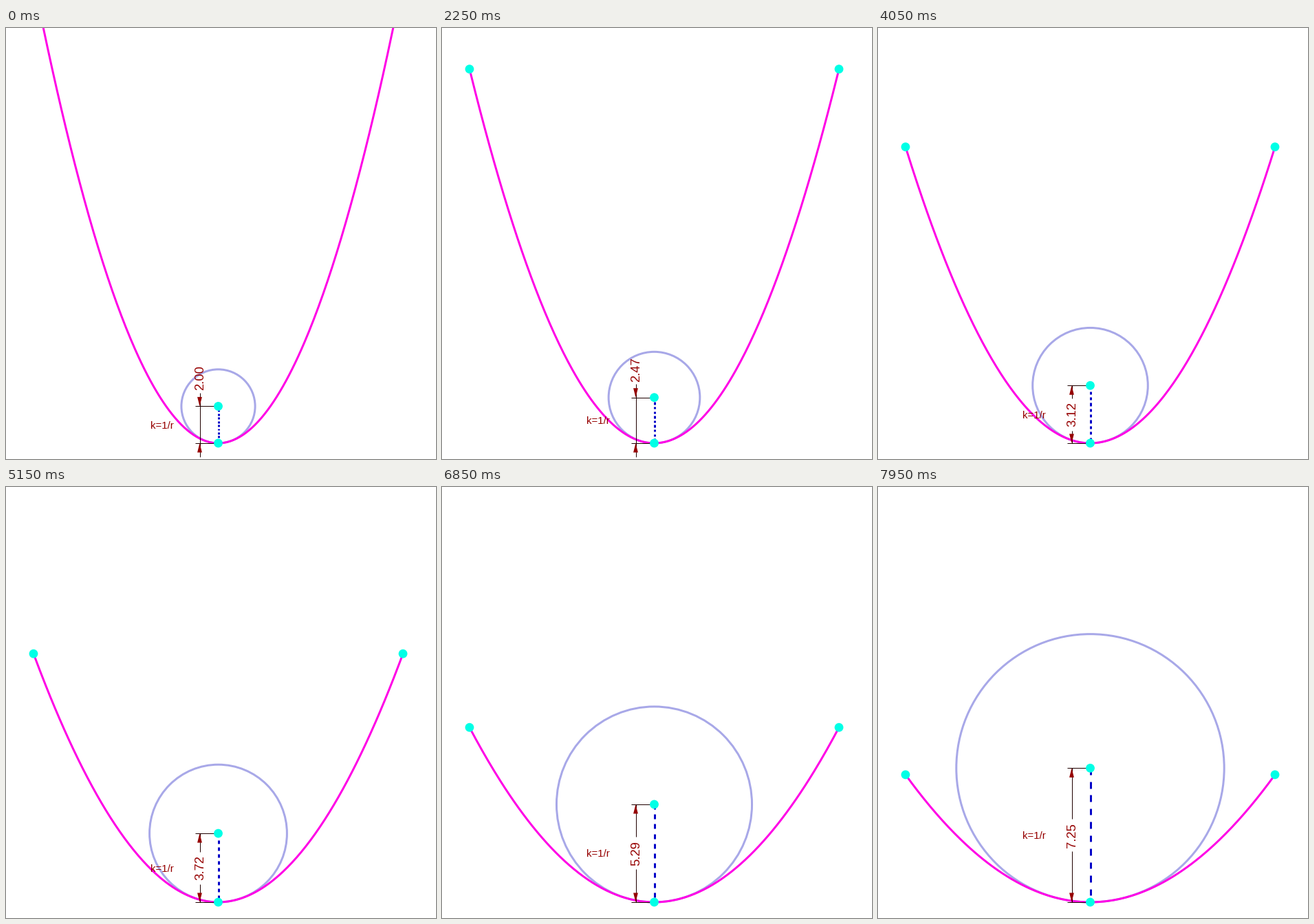
A matplotlib script that plays this animation: 625x626 px, repeating every 8000 ms.

```python
import numpy as np
import matplotlib.pyplot as plt
from matplotlib.animation import FuncAnimation
from matplotlib.patches import Circle, Polygon

W, H, DPI = 625, 626, 100
PT = 72 / DPI            # points per pixel
UNIT = 26.85             # pixels per length unit
CX, BASE = 308.5, 603    # lowest point of the parabola
DIM_X = 281.5            # dimension line
MAGENTA, LAVENDER, BLUE = "#ff00e6", "#a8a8e8", "#0000c8"
CYAN, RED, DARK = "#00ffe6", "#960000", "#200000"
STEP_MS, FRAMES = 50, 160

fig = plt.figure(figsize=(W / DPI, H / DPI), dpi=DPI, facecolor="white")
ax = fig.add_axes([0, 0, 1, 1])
ax.set_xlim(0, W)
ax.set_ylim(H, 0)
ax.axis("off")


def line(color, width, z):
    return ax.plot([], [], color=color, lw=width * PT, zorder=z,
                   solid_capstyle="butt")[0]


def dot(x, y):
    return ax.add_patch(Circle((x, y), 6.4, fc=CYAN, ec="none", zorder=6))


def arrow():
    return ax.add_patch(Polygon(np.zeros((3, 2)), fc=RED, ec="none", zorder=5))


def label(x, size, **kw):
    return ax.text(x, 0, "", fontsize=size * PT, color=RED, zorder=5,
                   family="Liberation Sans", va="baseline", **kw)


circle = ax.add_patch(Circle((CX, BASE), 1, fill=False, ec=LAVENDER,
                             lw=3 * PT, zorder=1))
curve = line(MAGENTA, 3, 2)
radius = line(BLUE, 3, 3)
dim = line(DARK, 1, 4)
ext = line(DARK, 1, 4)
arrows = [arrow(), arrow()]
center, vertex = dot(CX, BASE), dot(CX, BASE)
ends = [dot(CX - 10 * UNIT, 0), dot(CX + 10 * UNIT, 0)]
value = label(287.5, 18.5, rotation=90, rotation_mode="anchor", ha="center")
formula = label(210, 15, ha="left")
formula.set_text("k=1/r")

xs = np.linspace(-10, 10, 241)


def coefficient(step):
    """Opening of the parabola y = a x^2 with a gentle change of pace."""
    return 0.14145 - 0.392 * np.sin(0.006 * (step - 47))


def segments(pairs):
    """Join (start, stop) pairs into one list with breaks."""
    return [v for a, b in pairs for v in (a, b, np.nan)]


def vertical(artist, x, pairs):
    ys = segments(pairs)
    artist.set_data([x] * len(ys), ys)


def point_arrow(patch, tip, way):
    back = tip + way * 13.5
    patch.set_xy([(DIM_X, tip), (DIM_X - 3.4, back), (DIM_X + 3.4, back)])


def draw(i):
    step = 0 if i < 5 else (i - 5) // 2 + 1
    a = coefficient(step)
    r = 1 / (2 * a)
    size = r * UNIT
    top, mid = BASE - size, BASE - size / 2

    curve.set_data(CX + xs * UNIT, BASE - a * xs ** 2 * UNIT)
    circle.center = (CX, top)
    circle.set_radius(size)
    center.center = (CX, top)
    for e in ends:
        e.center = (e.center[0], BASE - 100 * a * UNIT)

    period = size / 10
    starts = top + period * np.arange(10)
    vertical(radius, CX, [(s, s + period / 2) for s in starts])

    ext.set_data([275, 303, np.nan, 275, 303], [top, top, np.nan, BASE, BASE])
    inside = size > 69
    way = 1 if inside else -1
    point_arrow(arrows[0], top, way)
    point_arrow(arrows[1], BASE, -way)
    if inside:
        vertical(dim, DIM_X, [(top, mid - 23.5), (mid + 23.5, BASE)])
    else:
        vertical(dim, DIM_X, [(top - 19.5, BASE + 20)])
    value.set_y(mid if inside else top - 41)
    value.set_text(f"{r:.2f}")
    formula.set_y(mid + 5.5)
    return []


anim = FuncAnimation(fig, draw, frames=FRAMES, interval=STEP_MS,
                     init_func=lambda: draw(0), repeat=True, repeat_delay=0)
plt.show()
```
